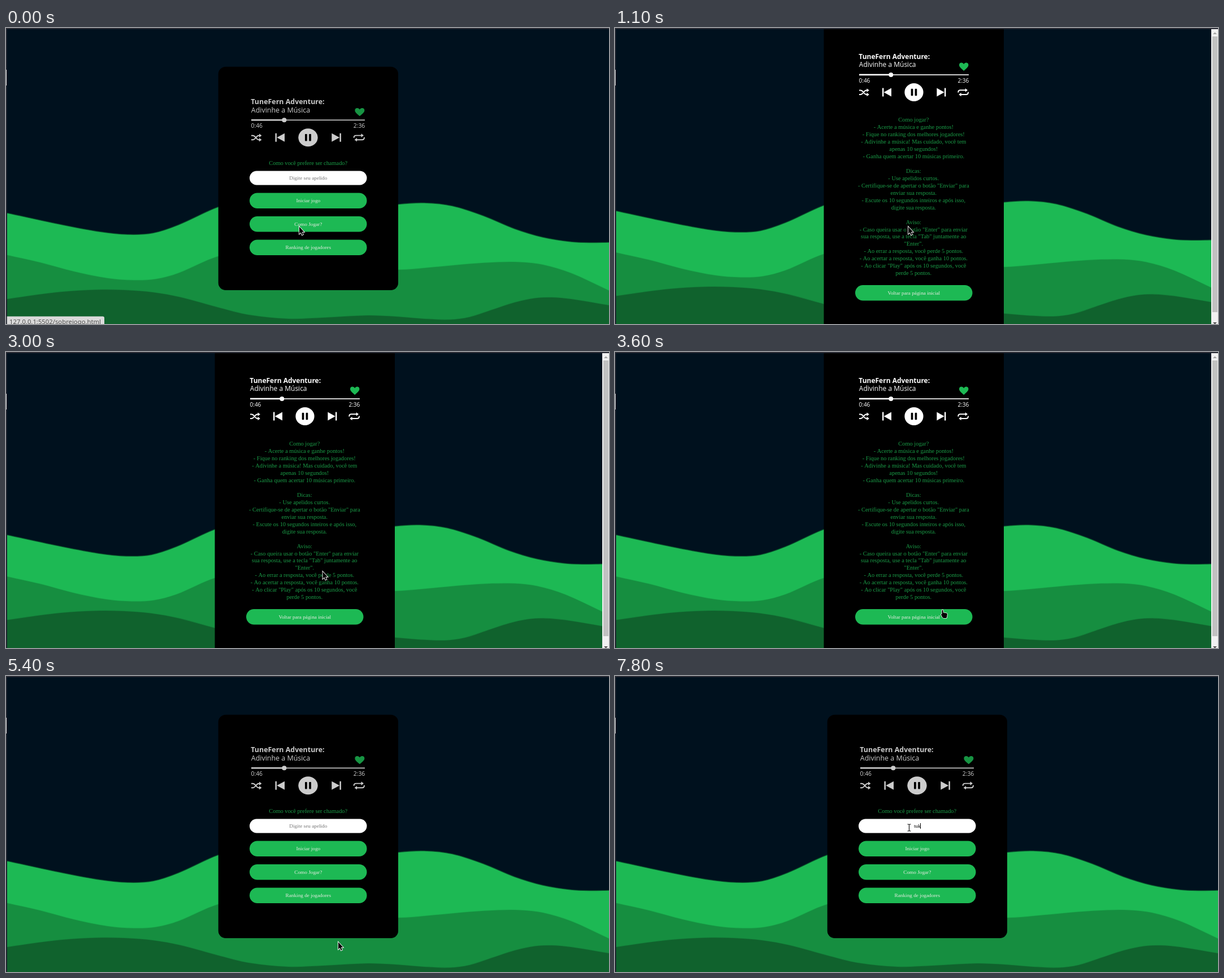
An HTML page with a canvas for the animation above (8 s loop, 1067x525 px).

```html
<!DOCTYPE html>
<html lang="pt-BR">
<head>
<meta charset="utf-8">
<title>Adivinhe a Música</title>
<style>
  html, body { margin: 0; width: 100%; height: 100%; overflow: hidden; background: #00111e; }
  canvas { display: block; }
</style>
</head>
<body>
<canvas id="stage" width="1067" height="525"></canvas>
<script>
const ctx = document.getElementById('stage').getContext('2d');
const LOOP = 8000;
const SERIF = '"Liberation Serif", serif';
const SANS = '"Open Sans", sans-serif';
const GREEN = '#1db954';
const NICK = 'tuk';

// Upper edges of the hills, as x, y pairs
const HILLS = [
  { color: GREEN, edge: 'rgba(6, 62, 36, .75)', pts: [2,328, 100,349, 165,361, 215,366, 260,363.5, 305,349, 376,317, 480,286,
    600,325, 694,312.5, 740,310, 790,315.5, 845,333, 900,356, 950,371, 1000,379, 1033,380.5, 1067,380] },
  { color: '#168e40', edge: 'rgba(22, 142, 64, .4)', pts: [2,403, 60,416, 120,432, 180,444, 225,447.5, 265,445.5, 305,435, 376,405,
    480,385, 600,425, 694,429, 760,424, 820,418.5, 870,415.5, 910,415.5, 950,420, 1000,435, 1067,466] },
  { color: '#10622d', edge: 'rgba(16, 98, 45, .4)', pts: [2,481, 50,474, 100,468, 160,464.5, 210,465, 260,469, 310,478, 376,496,
    430,509, 500,516, 560,514, 640,510, 690,512, 740,516, 785,517.5, 820,513, 860,500, 900,487, 935,479.5, 965,478, 1000,481, 1067,492] }
];

const RULES = [
  'Como jogar?',
  '- Acerte a música e ganhe pontos!',
  '- Fique no ranking dos melhores jogadores!',
  '- Adivinhe a música! Mas cuidado, você tem',
  'apenas 10 segundos!',
  '- Ganha quem acertar 10 músicas primeiro.',
  '',
  'Dicas:',
  '- Use apelidos curtos.',
  '- Certifique-se de apertar o botão "Enviar" para',
  'enviar sua resposta.',
  '- Escute os 10 segundos inteiros e após isso,',
  'digite sua resposta.',
  '',
  'Aviso:',
  '- Caso queira usar o botão "Enter" para enviar',
  'sua resposta, use a tecla "Tab" juntamente ao',
  '"Enter".',
  '- Ao errar a resposta, você perde 5 pontos.',
  '- Ao acertar a resposta, você ganha 10 pontos.',
  '- Ao clicar "Play" após os 10 segundos, você',
  'perde 5 pontos.'
];

// Pointer moves at ten steps a second: time, x, y, shape
const POINTER = [
  [0, 518.5, 352, arrow], [2100, 487.5, 328, arrow], [2200, 474, 292, arrow],
  [2300, 518, 248, arrow], [2400, 582, 227, arrow], [2500, 620, 234.5, arrow],
  [3000, 560, 389, arrow], [3200, 566, 407, arrow], [3300, 573.5, 426, arrow],
  [3500, 575.5, 442, arrow], [3600, 576.5, 457, hand], [3800, 581, 460, hand],
  [3900, 585.5, 464, hand], [4500, 587.5, 471.5, arrow], [6000, 545, 372, arrow],
  [6100, 515, 289, arrow], [6200, 520.5, 266, beam], [6400, 520.5, 262.5, beam]
];

function rect(x, y, w, h, color) {
  ctx.fillStyle = color;
  ctx.fillRect(x, y, w, h);
}

function pill(x, y, w, h, r, color) {
  ctx.fillStyle = color;
  ctx.beginPath();
  ctx.roundRect(x, y, w, h, r);
  ctx.fill();
}

function text(str, x, y, font, color, align = 'left') {
  ctx.font = font;
  ctx.fillStyle = color;
  ctx.textAlign = align;
  ctx.fillText(str, x, y);
}

function shape(d, fill, stroke, width) {
  const p = new Path2D(d);
  if (stroke) {
    ctx.strokeStyle = stroke;
    ctx.lineWidth = width;
    ctx.stroke(p);
  }
  if (fill) {
    ctx.fillStyle = fill;
    ctx.fill(p);
  }
}

// Smooth curve through all points
function spline(p) {
  const n = p.length / 2;
  const at = i => { const k = 2 * Math.max(0, Math.min(n - 1, i)); return [p[k], p[k + 1]]; };
  let d = `M${p[0]} ${p[1]}`;
  for (let i = 0; i < n - 1; i++) {
    const [a, b, c, e] = [at(i - 1), at(i), at(i + 1), at(i + 2)];
    const step = (c[0] - b[0]) / 3;
    const s1 = (c[1] - a[1]) / (c[0] - a[0]), s2 = (e[1] - b[1]) / (e[0] - b[0]);
    d += `C${b[0] + step} ${b[1] + s1 * step} ${c[0] - step} ${c[1] - s2 * step} ${c[0]} ${c[1]}`;
  }
  return d;
}
for (const hill of HILLS) hill.top = spline(hill.pts);

function backdrop(scale) {
  rect(0, 0, 1067, 525, '#00111e');
  ctx.save();
  ctx.translate(2, 2);
  ctx.scale(scale, scale);
  ctx.translate(-2, -2);
  for (const hill of HILLS) {
    shape(hill.top + 'V540H2Z', hill.color);
    shape(hill.top, null, hill.edge, 1.6);
  }
  ctx.restore();
}

function windowEdge() {
  rect(0, 0, 1067, 2, '#2a2c35');
  rect(0, 0, 1.5, 525, '#2a2d36');
  rect(0, 74, 1, 28, '#e8e8e8');
}

function player(x, y, stretch, ink, heart) {
  ctx.save();
  ctx.translate(x, y);
  ctx.scale(stretch, 1);
  text('TuneFern Adventure:', -.7, 55, `bold 12px ${SANS}`, ink);
  text('Adivinhe a Música', -.2, 69.3, `12px ${SANS}`, ink);
  shape('M185.2 76C180 71.4 177 69 177 65.6C177 63.2 178.800 61.600 181 61.600C182.800 61.600 184.300 62.500 185.200 64.200C186.100 62.500 187.600 61.600 189.400 61.600C191.600 61.600 193.400 63.200 193.400 65.600C193.400 69 190.400 71.400 185.200 76Z', heart);

  rect(0, 82.2, 194, 1.6, ink);
  rect(0, 81.6, 56, 2.6, ink);
  shape('M52.300 83a4 4 0 1 0 8 0a4 4 0 1 0 -8 0Z', ink);
  text('0:46', -.5, 96.600, `10px ${SANS}`, ink);
  text('2:36', 194.300, 96.600, `10px ${SANS}`, ink, 'right');

  // Shuffle
  shape('M0 110.500H2.500C7.500 110.500 8 118 13 118H14.500M0 118H2.500C7.500 118 8 110.500 13 110.500H14.500', null, ink, 1.9);
  shape('M13.500 107.300L17.800 110.500L13.500 113.700ZM13.500 114.800L17.800 118L13.500 121.200Z', ink);
  // Previous and next
  shape('M41 106.500H43.400V121.500H41ZM57 106.500V121.500L43.600 114Z', ink);
  shape('M153.400 106.500H151V121.500H153.400ZM137.400 106.500V121.500L150.800 114Z', ink);
  // Pause
  ctx.beginPath();
  ctx.ellipse(97, 114, 16.600, 16, 0, 0, Math.PI * 2);
  ctx.fillStyle = ink;
  ctx.fill();
  pill(91.700, 107.700, 3.700, 12.600, 1, '#000');
  pill(98.600, 107.700, 3.700, 12.600, 1, '#000');
  // Repeat
  shape('M175.300 114.500V114C175.300 111.500 177 110.300 179 110.300H189M193 113.500V114C193 116.700 191.200 118 189.200 118H179.500', null, ink, 1.9);
  shape('M187.700 107L192 110.300L187.700 113.600ZM180.600 114.700L176.300 118L180.600 121.300Z', ink);
  ctx.restore();
}

function button(label, x, y) {
  pill(x, y, 207.5, 27.5, 13.75, GREEN);
  text(label, x + 103.8, y + 16.9, `9.22px ${SERIF}`, '#e6ebe2', 'center');
}

function nickField(t) {
  const font = `9.22px ${SERIF}`, mid = 534.8;
  pill(431, 253.5, 207.5, 25, 12.5, '#fff');
  const typed = NICK.slice(0, t < 7500 ? 0 : t < 7600 ? 1 : t < 7800 ? 2 : 3);
  if (typed) text(typed, mid, 269.1, font, '#000', 'center');
  else text('Digite seu apelido', mid, 269.1, font, '#757575', 'center');
  if (t >= 6600) {
    const half = typed ? ctx.measureText(typed).width / 2 : 0;
    rect(Math.round(mid + half - .3), 261, 1, 10, '#000');
  }
}

function home(t) {
  backdrop(1);
  pill(375.7, 68.7, 318.3, 396.3, 13, '#000');
  player(434, 80.3, 1.036, '#cccccc', '#179443');
  text('Como você prefere ser chamado?', 534.7, 243, `10.38px ${SERIF}`, '#1a9c47', 'center');
  nickField(t);
  button('Iniciar jogo', 431, 292.5);
  button('Como Jogar?', 431, 334);
  button('Ranking de jogadores', 431, 375.5);
}

function help() {
  backdrop(1053 / 1065);
  rect(369.5, 2, 318.5, 523, '#000');
  player(432, 0, 1, '#fff', GREEN);
  RULES.forEach((line, i) =>
    text(line, 528.3, 166.2 + i * 12.955, `10.38px ${SERIF}`, '#1a9c47', 'center'));
  button('Voltar para página inicial', 425, 456);

  rect(1055, 2, 12, 523, '#f1f1f1');
  rect(1057, 15, 9, 489, '#c1c1c1');
  shape('M1058 11L1061.500 7.500L1065 11Z', '#a3a3a3');
  shape('M1058 522L1061.500 525.500L1065 522Z', '#505050');
}

function status(address) {
  ctx.font = '11.3px "Noto Sans", sans-serif';
  const w = ctx.measureText(address).width;
  pill(1.5, 511.5, w + 10.5, 20, [0, 3, 0, 0], '#dadada');
  text(address, 6, 525, ctx.font, '#505050');
}

function arrow() {
  shape('M.500 .500V13.200L3.300 10.600L5.300 15.200L7.300 14.300L5.300 9.800H9Z', '#000', '#fff', 1.8);
}

function hand() {
  ctx.lineJoin = 'round';
  shape('M2 1.500C2 0 4.200 0 4.200 1.500V5.300L9.800 6.300C11 6.600 11.400 7.300 11.300 8.500L10.800 12.500C10.500 14.500 9.800 15 8.500 15H5.500C3.800 15 3 14 2.300 12.500L.600 9C.200 8 1.200 7.400 2 8.200Z', '#000', '#fff', 1.7);
  ctx.lineJoin = 'miter';
}

function beam() {
  const d = 'M-3 .500H-1L0 1.300L1 .500H3M0 1.300V11.700M-3 12.500H-1L0 11.700L1 12.500H3';
  shape(d, null, '#fff', 2.400);
  shape(d, null, '#111', 1.200);
}

function pointer(t) {
  const [, x, y, draw] = POINTER.findLast(k => k[0] <= t);
  ctx.save();
  ctx.translate(x, y);
  draw();
  ctx.restore();
}

function frame(now) {
  const t = now % LOOP;
  if (t >= 1100 && t < 5400) help();
  else home(t);
  if (t < 800) status('127.0.0.1:5502/sobrejogo.html');
  if (t >= 3800 && t < 5400) status('127.0.0.1:5502/index.html');
  windowEdge();
  pointer(t);
}

const start = performance.now();
function tick() {
  frame(performance.now() - start);
  requestAnimationFrame(tick);
}
tick();
</script>
</body>
</html>
```
